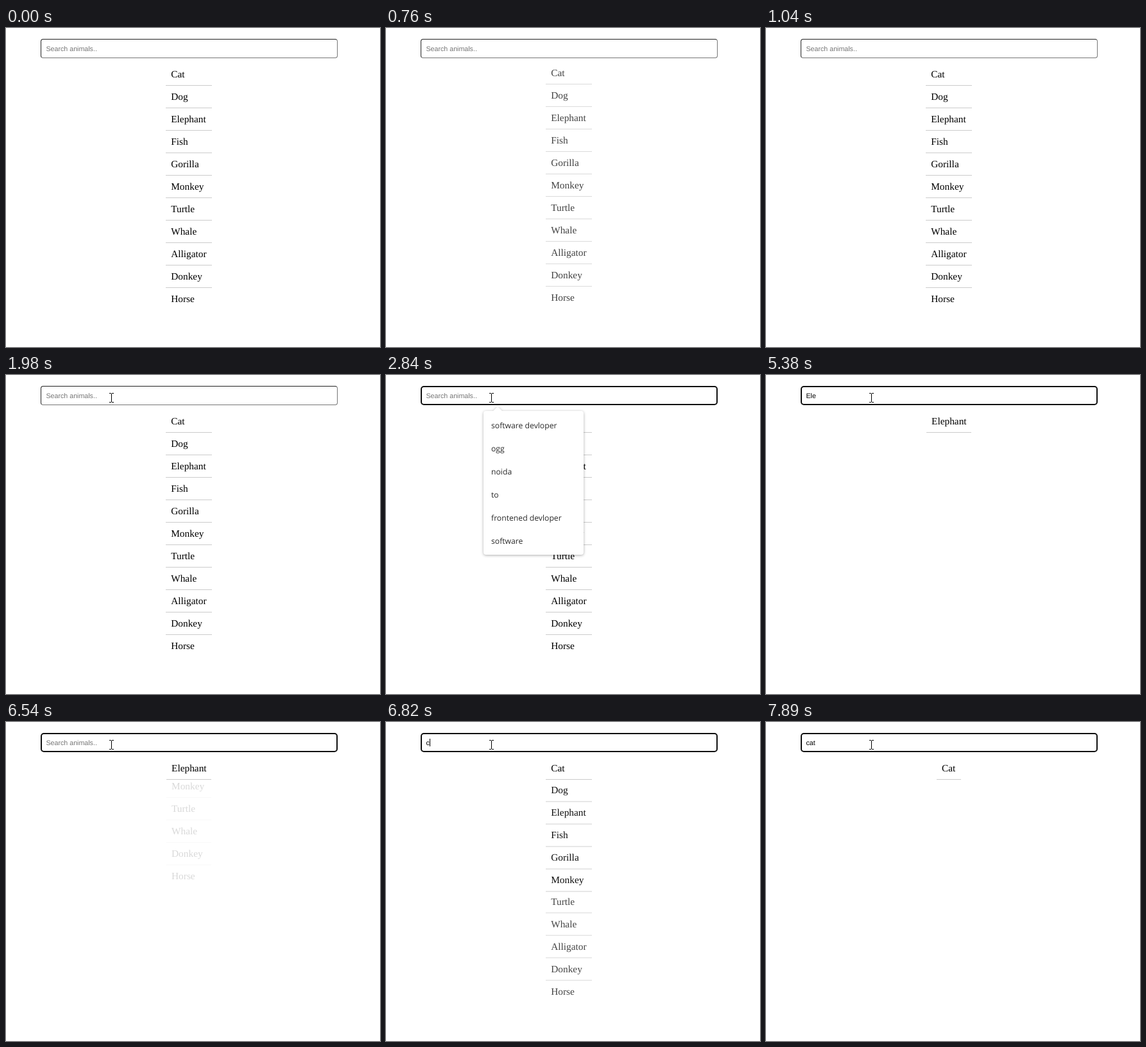
Recreate the animation shown at these times as an HTML page. Size 583x497 px, loop 8 s.

```html
<!DOCTYPE html>
<html lang="en">
<head>
<meta charset="utf-8">
<title>Animal search</title>
<style>
  html, body { margin: 0; width: 100%; height: 100%; overflow: hidden; background: #fff; }
  svg { position: absolute; left: 0; top: 0; display: block; }
  text { text-rendering: geometricPrecision; white-space: pre; }
  #field {
    position: absolute; left: 54px; top: 17px; width: 463px; height: 30px;
    box-sizing: border-box; border: 1px solid; border-color: #222 #767676 #767676 #222;
    border-radius: 4px; background: #fff;
  }
  #field.focus { border: 2px solid #101010; border-radius: 5px; }
  #typed { font: 10.667px "Liberation Sans", Arial, sans-serif; }
  #rows { font: 15.36px "Liberation Serif", "Times New Roman", serif; }
  #popup { font: 12.2px "Open Sans", "Noto Sans", sans-serif; fill: #2a2a2a; }
  #panel { fill: #fff; filter: drop-shadow(0 1px 2px rgba(0, 0, 0, .32)); }
</style>
</head>
<body>
<div id="field"></div>
<svg width="583" height="497" viewBox="0 0 583 497">
  <text id="typed" x="62.5" y="36"></text>
  <rect id="caret" y="26" width="1" height="12"/>
  <g id="rows"></g>
  <g id="popup">
    <path id="panel" d="M156 56H167L174 49L181 56H304a4 4 0 0 1 4 4V276a4 4 0 0 1-4 4H156a4 4 0 0 1-4-4V60a4 4 0 0 1 4-4Z"/>
  </g>
  <g id="cursor">
    <path id="arrow" d="M.5.5V16.5L4.2 13L6.7 18.7L9 17.7L6.6 12.2H11.8Z" fill="#fff" stroke="#000"/>
    <path id="beam" d="M-3-7H0V-6H1V-7H4V-6H1V7H4V8H1V7H0V8H-3V7H0V-6H-3Z"/>
  </g>
</svg>
<script>
const LOOP = 8000, ROW = 35, CENTER = 285, TEXT_X = 62.5;
const ENTER_MS = 500, ENTER_SHIFT = 8;
const animals = ['Cat', 'Dog', 'Elephant', 'Fish', 'Gorilla', 'Monkey',
  'Turtle', 'Whale', 'Alligator', 'Donkey', 'Horse'];
const suggestions = ['software devloper', 'ogg', 'noida', 'to', 'frontened devloper', 'software'];

// [time, text in the field, caret visible]
const typing = [
  [0, '', false], [2310, '', true], [2840, '', false],
  [3310, 'E', true], [3590, 'El', true], [3790, 'Ele', true],
  [4320, 'Ele', false], [4850, 'Ele', true], [5380, 'Ele', false], [5880, 'Ele', true],
  [6210, 'El', true], [6410, 'E', true], [6540, '', false],
  [6810, 'c', true], [7160, 'ca', true], [7360, 'cat', true], [7890, 'cat', false],
];

// [time, query, list width]; a null query leaves the list empty
const lists = [
  [-1000, '', 72], [500, null, 72], [540, '', 72],
  [3370, 'e', 70], [3650, 'el', 70],
  [6475, 'e', 70], [6605, '', 72], [6875, 'c', 38],
].map(([time, query, width]) => ({
  time, width, names: query === null ? [] : animals.filter(a => a.toLowerCase().includes(query)),
}));

// [time, x, y]
const pointer = [[1700, 127, 1], [1770, 143, 13], [1840, 155, 24], [1910, 161, 31], [1980, 164, 35]];

const $ = id => document.getElementById(id);
const add = (parent, tag, attrs) => {
  const el = document.createElementNS('http://www.w3.org/2000/svg', tag);
  set(el, attrs);
  return parent.appendChild(el);
};
const set = (el, attrs) => { for (const k in attrs) el.setAttribute(k, attrs[k]); };
const show = (el, on) => { el.style.display = on ? '' : 'none'; };
const latest = (steps, t) => steps.filter(s => s[0] <= t).pop();
const clamp = v => Math.min(1, Math.max(0, v));

// The CSS "ease" curve
function ease(p) {
  if (p <= 0 || p >= 1) return clamp(p);
  const bezier = (s, a, b) => 3 * s * (1 - s) ** 2 * a + 3 * s * s * (1 - s) * b + s ** 3;
  let lo = 0, hi = 1;
  for (let i = 0; i < 20; i++) {
    const mid = (lo + hi) / 2;
    if (bezier(mid, .25, .25) < p) lo = mid; else hi = mid;
  }
  return bezier(lo, .1, 1);
}

const rows = animals.map((_, i) => {
  const group = add($('rows'), 'g', {});
  return {
    group,
    label: add(group, 'text', { y: 77 + i * ROW }),
    line: add(group, 'rect', { y: 89 + i * ROW, height: 1, fill: '#ccc' }),
  };
});
suggestions.forEach((s, i) => { add($('popup'), 'text', { x: 164, y: 83 + i * 36 }).textContent = s; });

const measure = document.createElement('canvas').getContext('2d');
measure.font = '10.667px "Liberation Sans", Arial, sans-serif';

function drawField(t) {
  const [, text, caretOn] = latest(typing, t);
  $('field').classList.toggle('focus', t >= 2310);
  $('typed').textContent = text || 'Search animals..';
  $('typed').setAttribute('fill', text ? '#000' : '#757575');
  show($('caret'), caretOn);
  $('caret').setAttribute('x', Math.round(TEXT_X + measure.measureText(text).width));
}

// Rows keep their identity by index, so only newly added indexes fade in
function rowBirth(i, past) {
  let birth = 0;
  past.forEach((list, k) => {
    if (list.names.length > i && !(k && past[k - 1].names.length > i)) birth = list.time;
  });
  return birth;
}

function drawList(t) {
  const past = lists.filter(l => l.time <= t);
  const { names, width } = past[past.length - 1];
  const left = CENTER - width / 2;
  rows.forEach(({ group, label, line }, i) => {
    show(group, i < names.length);
    if (i >= names.length) return;
    const p = ease((t - rowBirth(i, past)) / ENTER_MS);
    set(group, { opacity: p, transform: `translate(0 ${-ENTER_SHIFT * (1 - p)})` });
    label.textContent = names[i];
    set(label, { x: left + 8 + (width === 72 ? .2 : 0) });
    set(line, { x: left, width });
    show(line, i === 0 || i < names.length - 1);
  });
}

function drawPopup(t) {
  const p = t < 3000 ? clamp((t - 2340) / 150) : 1 - clamp((t - 3340) / 150);
  const scale = .95 + .05 * p;
  show($('popup'), p > 0);
  set($('popup'), { opacity: p, transform: `translate(230 168) scale(${scale}) translate(-230 -168)` });
}

function drawCursor(t) {
  const at = latest(pointer, t);
  show($('cursor'), at);
  if (!at) return;
  const [, x, y] = at;
  set($('cursor'), { transform: `translate(${x} ${y})` });
  show($('arrow'), y < 17);
  show($('beam'), y >= 17);
}

const start = performance.now();
function frame() {
  const t = (performance.now() - start) % LOOP;
  drawField(t);
  drawList(t);
  drawPopup(t);
  drawCursor(t);
  requestAnimationFrame(frame);
}
frame();
</script>
</body>
</html>
```
